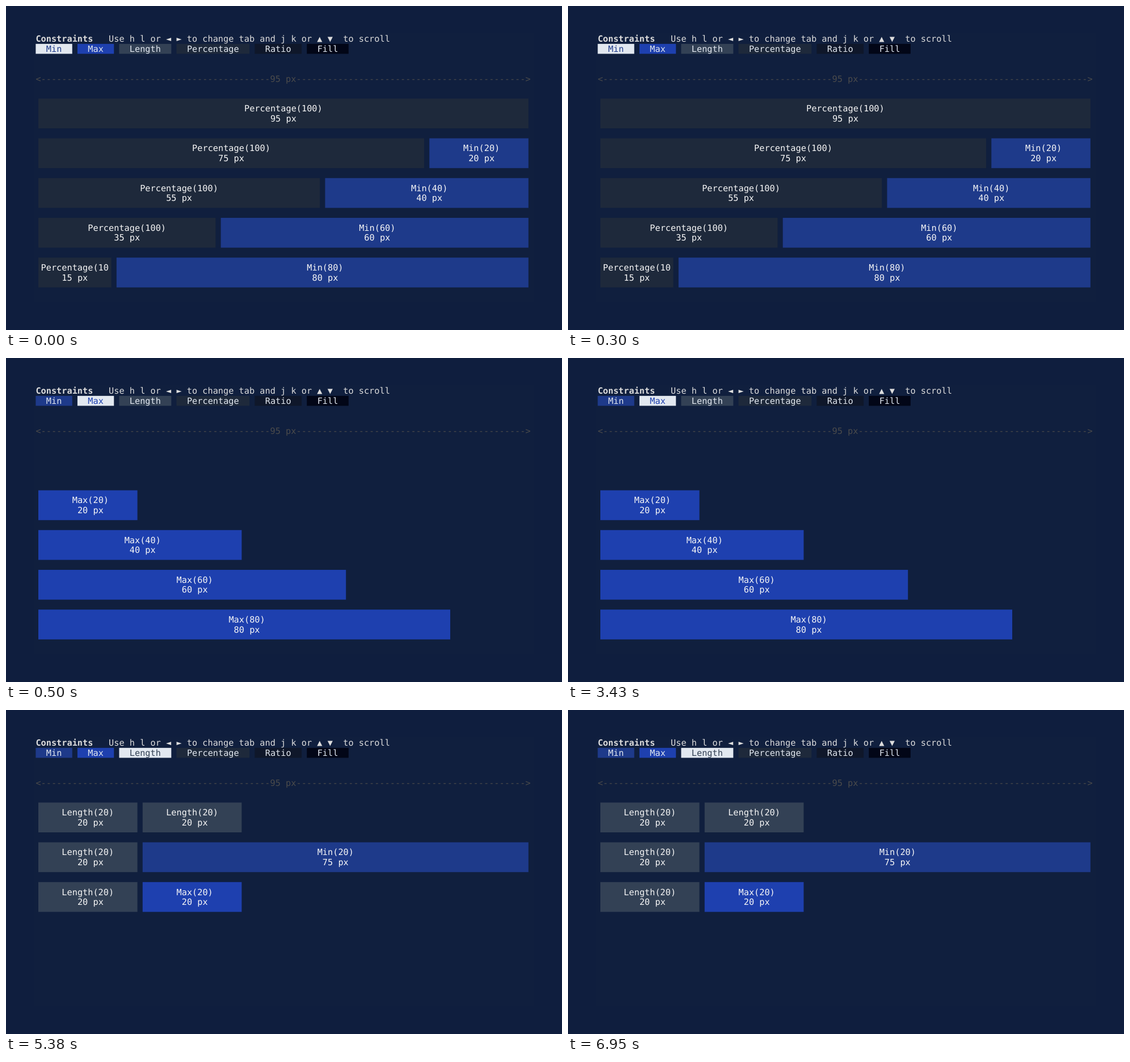
Write an HTML page that moves like this. It is 980 px wide and 572 px high and loops after 8 s.

```html
<!DOCTYPE html>
<html lang="en">
<head>
<meta charset="utf-8">
<title>Constraints</title>
<style>
  html, body { margin: 0; width: 100%; height: 100%; overflow: hidden; background: #0f1e3e; }
  svg { display: block; width: 980px; height: 572px; }
  text {
    font: 15.264px "DejaVu Sans Mono", monospace;
    white-space: pre;
    text-rendering: geometricPrecision;
  }
  .bold { font-weight: bold; }
  .scene { opacity: 0; animation: 8s step-end infinite; }
  .min { animation-name: min; }
  .max { animation-name: max; }
  .length { animation-name: length; }
  @keyframes min { 0% { opacity: 1 } 6.25%, 100% { opacity: 0 } }
  @keyframes max { 0% { opacity: 0 } 6.25% { opacity: 1 } 67.25%, 100% { opacity: 0 } }
  @keyframes length { 0% { opacity: 0 } 67.25%, 100% { opacity: 1 } }
</style>
</head>
<body>
<svg id="stage" viewBox="0 0 980 572"></svg>
<script>
const CELL_W = 9.19, CELL_H = 17.55, LEFT = 52.4, TOP = 49.3, ASCENT = 14;
const COLORS = {
  Min: '#1e3a8a', Max: '#1e40af', Length: '#334155',
  Percentage: '#1e293b', Ratio: '#0f172a', Fill: '#020617'
};
const PALE = '#e2e8f0', WHITE = '#f7f7f7', PLAIN = '#dddddd', DIM = '#4b4b4b';
const stage = document.getElementById('stage');

function add(parent, tag, attrs) {
  const node = document.createElementNS('http://www.w3.org/2000/svg', tag);
  for (const key in attrs) node.setAttribute(key, attrs[key]);
  return parent.appendChild(node);
}

// Positions and sizes are in terminal cells.
function box(parent, col, row, cols, rows, fill) {
  add(parent, 'rect', {
    x: LEFT + col * CELL_W, y: TOP + row * CELL_H,
    width: cols * CELL_W, height: rows * CELL_H, fill
  });
}

function write(parent, col, row, string, fill, cls = '') {
  add(parent, 'text', {
    x: LEFT + col * CELL_W, y: TOP + row * CELL_H + ASCENT, fill, class: cls
  }).textContent = string;
}

function drawTabs(scene, selected) {
  let col = 0;
  for (const [name, color] of Object.entries(COLORS)) {
    const on = name === selected;
    box(scene, col, 1, name.length + 4, 1, on ? PALE : color);
    write(scene, col + 2, 1, name, on ? color : PALE);
    col += name.length + 5;
  }
}

function drawBlock(scene, col, row, width, label) {
  box(scene, col + 0.5, row + 0.5, width - 1, 3, COLORS[label.split('(')[0]]);
  [label.slice(0, width - 2), width + ' px'].forEach((line, i) => {
    const indent = Math.floor(width / 2) - Math.floor(line.length / 2);
    write(scene, col + indent, row + 1 + i, line, WHITE);
  });
}

function drawScene(selected, rows) {
  const scene = add(stage, 'g', { class: 'scene ' + selected.toLowerCase() });
  drawTabs(scene, selected);
  rows.forEach((blocks, i) => {
    let col = 0;
    for (const [label, width] of blocks) {
      drawBlock(scene, col, 6 + i * 4, width, label);
      col += width;
    }
  });
}

add(stage, 'rect', { width: 980, height: 572, fill: '#0f1e3e' });
add(stage, 'rect', { x: 49, y: 48, width: 882, height: 474, fill: '#101f3e' });
write(stage, 0, 0, 'Constraints', PLAIN, 'bold');
write(stage, 14, 0, 'Use h l or ◄ ► to change tab and j k or ▲ ▼  to scroll', PLAIN);
const dashes = '-'.repeat(44);
write(stage, 0, 4, `<${dashes}95 px${dashes}>`, DIM);

const steps = [20, 40, 60, 80];
drawScene('Min', [
  [['Percentage(100)', 95]],
  ...steps.map(n => [['Percentage(100)', 95 - n], [`Min(${n})`, n]])
]);
drawScene('Max', [[], ...steps.map(n => [[`Max(${n})`, n]])]);
drawScene('Length', [['Length(20)', 20], ['Min(20)', 75], ['Max(20)', 20]]
  .map(block => [['Length(20)', 20], block]));
</script>
</body>
</html>
```
